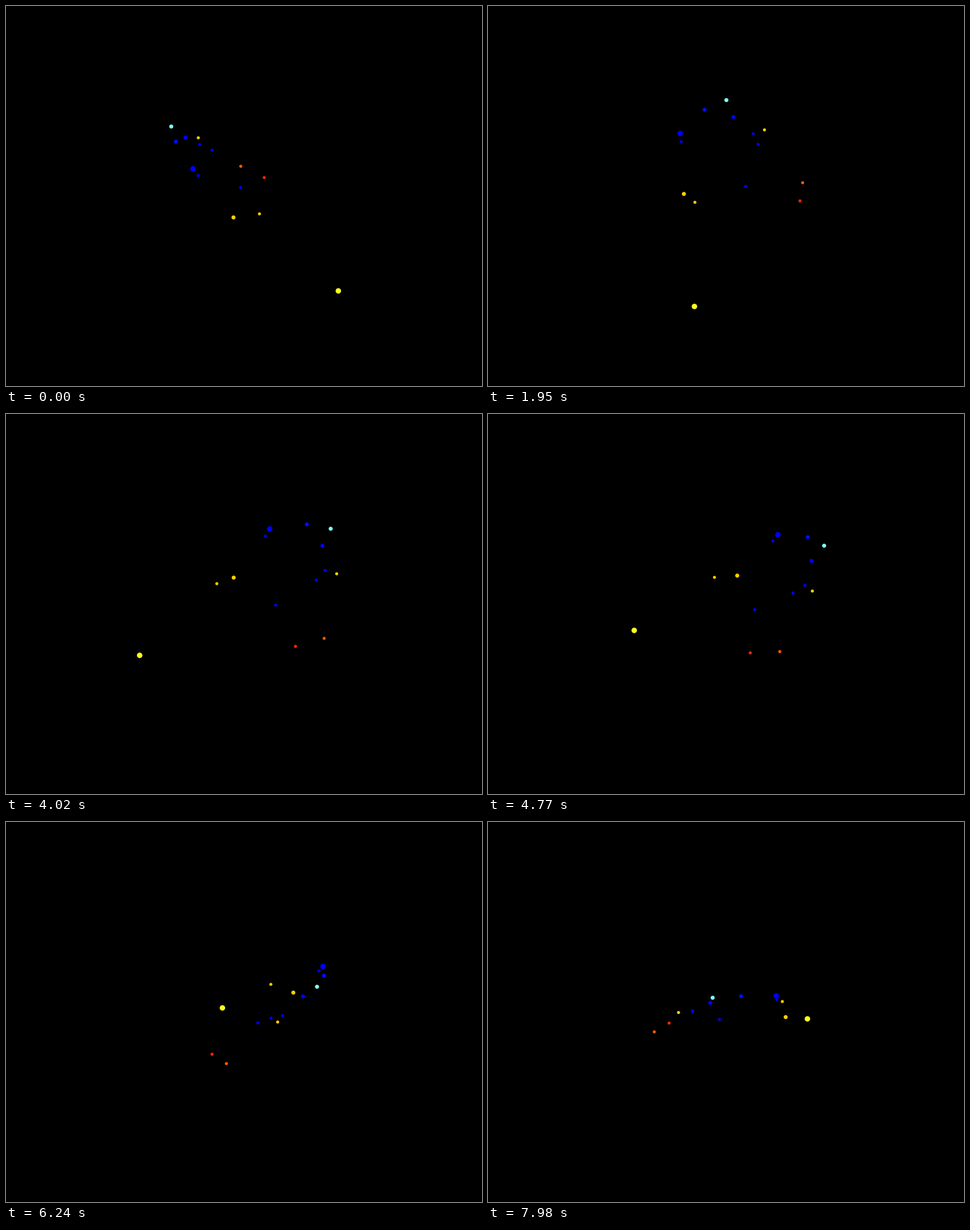
A matplotlib script for the animation above (8000 ms loop, 837 by 669 pixels).

```python
import numpy as np
import matplotlib.pyplot as plt
from matplotlib.animation import FuncAnimation
from matplotlib.colors import to_rgba_array

W, H, DPI = 837, 669, 100
LOOP, FRAMES = 8000, 267
CX, CY = 435.92, 330.88      # screen position of the rotation centre
DIST, SCALE = 10, 2784.5     # camera distance, pixels per projected unit
ELEV = np.radians(30)

BIG, MID, SMALL = 9.6, 7.1, 5.4   # dot diameters in pixels

# x, y, z, diameter, colour
DOTS = [
    (0.5196, 0.5196, -0.3897, BIG, "#ffff20"),
    (0.2175, -0.3715, 0.3030, BIG, "#0000ff"),
    (-0.1740, -0.5196, 0.3897, MID, "#7fffff"),
    (-0.0030, -0.4835, 0.3727, MID, "#000cff"),
    (-0.1840, -0.4324, 0.3050, MID, "#0000ff"),
    (0.3033, -0.1256, 0.0083, MID, "#ffd000"),
    (-0.5196, -0.0870, -0.0880, SMALL, "#ff5a00"),
    (-0.4220, 0.0680, -0.1190, SMALL, "#ff2800"),
    (-0.3726, -0.3590, 0.2038, SMALL, "#ffd000"),
    (0.2972, 0.0340, 0.0302, SMALL, "#f8c800"),
    (-0.2863, -0.3470, 0.2003, SMALL, "#0000f4"),
    (-0.2842, -0.2685, 0.1607, SMALL, "#0000f4"),
    (0.2250, -0.3402, 0.2602, SMALL, "#0000f4"),
    (-0.1088, -0.0850, -0.0153, SMALL, "#0000f4"),
]
px, py, pz, diam = np.array([d[:4] for d in DOTS]).T
colors = to_rgba_array([d[4] for d in DOTS])
sizes = (diam * 72 / DPI) ** 2


def project(azim):
    """Perspective view from the given azimuth: screen points and depth."""
    c, s = np.cos(azim), np.sin(azim)
    side = c * py - s * px
    front = c * px + s * py
    up = np.cos(ELEV) * pz - np.sin(ELEV) * front
    near = np.sin(ELEV) * pz + np.cos(ELEV) * front
    k = SCALE / (DIST - near)
    return np.column_stack([CX + k * side, CY - k * up]), near


# the tiny offset keeps rounding from losing a pixel
fig = plt.figure(figsize=((W + 1e-4) / DPI, (H + 1e-4) / DPI), dpi=DPI,
                 facecolor="black")
ax = fig.add_axes([0, 0, 1, 1])
ax.set_xlim(0, W)
ax.set_ylim(H, 0)
ax.axis("off")
dots = ax.scatter(px, py, s=sizes, c=colors, linewidths=0)


def update(i):
    pts, near = project(np.radians(i))
    order = np.argsort(near)
    dots.set_offsets(pts[order])
    dots.set_sizes(sizes[order], DPI)
    dots.set_facecolors(colors[order])
    return [dots]


anim = FuncAnimation(fig, update, frames=FRAMES, interval=LOOP / FRAMES,
                     init_func=lambda: update(0), repeat=True, repeat_delay=0)
plt.show()
```
